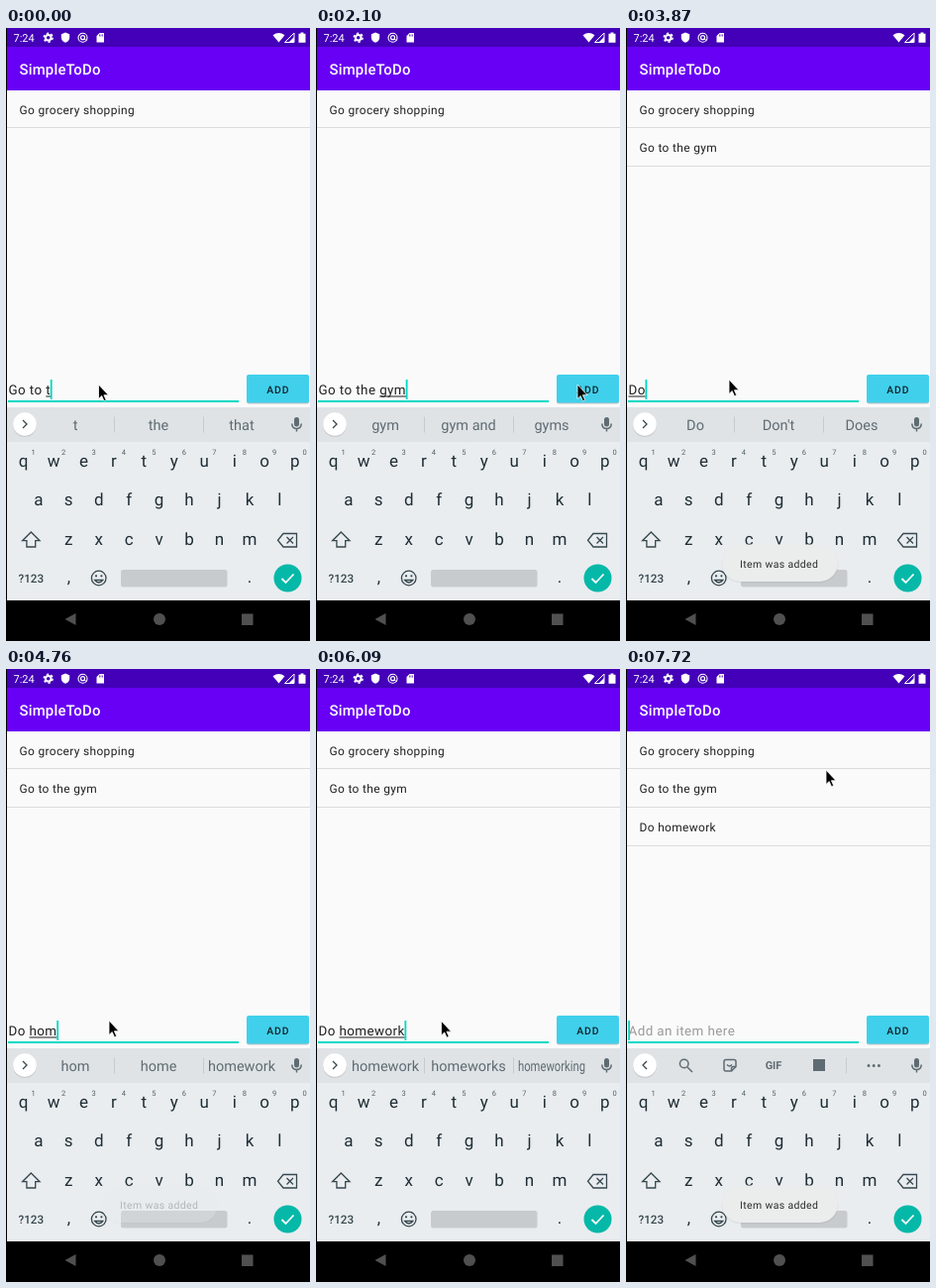
Animation of 307x619 px, one loop 8000 ms. Source, as an HTML page:

```html
<!DOCTYPE html>
<html lang="en">
<head>
<meta charset="utf-8">
<title>To-do list</title>
<style>
html, body { margin: 0; width: 100%; height: 100%; overflow: hidden; background: #000; }
svg { display: block; width: 307px; height: 619px; font-family: Roboto, sans-serif; text-rendering: geometricPrecision; }
text { white-space: pre; }
.row { font-size: 11.9px; letter-spacing: .37px; fill: #202020; }
.field { font-size: 13.4px; letter-spacing: .42px; }
.word { font-size: 14.5px; fill: #5f6b72; text-anchor: middle; }
.key { font-size: 17px; fill: #1f2d35; text-anchor: middle; }
.digit { font-size: 7.5px; fill: #546168; text-anchor: middle; }
.line { fill: none; stroke: #37474f; stroke-width: 1.3; }
.tool { fill: none; stroke: #5f6b72; stroke-width: 1.5; }
</style>
</head>
<body>
<svg viewBox="0 0 307 619">
  <rect width="307" height="619" fill="#000"/>
  <rect x="1" width="306" height="19" fill="#4300b8"/>
  <rect x="1" y="19" width="306" height="44" fill="#6800f5"/>
  <rect x="1" y="63" width="306" height="320" fill="#fafafa"/>

  <!-- status bar -->
  <g fill="#fff">
    <text x="7.5" y="13.5" font-size="11">7:24</text>
    <circle cx="42.7" cy="9.7" r="2.8" fill="none" stroke="#fff" stroke-width="2"/>
    <circle cx="42.7" cy="9.7" r="4.4" fill="none" stroke="#fff" stroke-width="1.6" stroke-dasharray="2.3 2.3"/>
    <path d="M60 4.5l4.2 1.7v3.2c0 2.700-1.800 4.600-4.200 5.400-2.400-.8-4.200-2.700-4.200-5.400V6.200z"/>
    <circle cx="77.500" cy="9.700" r="4.500" fill="none" stroke="#fff" stroke-width="1.100"/>
    <circle cx="77.500" cy="9.700" r="2" fill="none" stroke="#fff" stroke-width="1.200"/>
    <path d="M79.500 8v3.500l2 1" fill="none" stroke="#fff"/>
    <path d="M94.500 5h4.500v9.500h-7.500v-6.500z"/>
    <path d="M94.500 6.500v2M96 6.500v2M97.500 6.500v2" stroke="#4300b8" stroke-width=".7"/>
    <path d="M275.500 14.500L269.500 7.200q6-4.600 12 0z"/>
    <path d="M291 5v9.500h-9.500z" fill="none" stroke="#fff"/>
    <path d="M291 9v5.500h-5.500z"/>
    <path d="M295.500 5.800h2v-1.300h3v1.300h2v9h-7z"/>
  </g>
  <text x="13.500" y="47" font-size="14.900" font-weight="500" letter-spacing=".19" fill="#fff">SimpleToDo</text>

  <g id="rows"></g>

  <!-- input and button -->
  <text id="hint" class="field" x="2.500" y="370" fill="#9a9a9a">Add an item here</text>
  <text id="typed" class="field" x="2.500" y="370" fill="#202020"></text>
  <rect id="under" y="371.500" height="1" fill="#202020"/>
  <rect x="2" y="376" width="233" height="2" fill="#00d9c4"/>
  <rect id="caret" y="355" width="1.800" height="20" fill="#00d9c4"/>
  <rect x="243" y="351.500" width="63" height="28" rx="2" fill="#000" opacity=".22"/>
  <rect id="button" x="243" y="350" width="63" height="28.500" rx="2"/>
  <text x="274.800" y="368.500" font-size="10.400" font-weight="500" letter-spacing=".8" text-anchor="middle" fill="#0c2026">ADD</text>

  <!-- keyboard -->
  <rect x="1" y="383" width="306" height="195" fill="#e9edef"/>
  <rect x="1" y="383" width="306" height="35" fill="#dfe3e6"/>
  <circle cx="19" cy="401" r="12" fill="#000" opacity=".1"/>
  <circle cx="19" cy="400" r="11.800" fill="#fff"/>
  <path id="chevron" d="M-2 -4l4 4-4 4" class="line" stroke-width="1.600"/>
  <g id="words"><path d="M109.500 392.500v16M199.500 392.500v16" stroke="#c6cbce"/></g>
  <g id="tools" class="tool">
    <circle cx="58.700" cy="398.500" r="4.300"/>
    <path d="M62 402l5 5"/>
    <path d="M101 394.500h8q2 0 2 2v5l-4.500 4.500h-5.500q-2 0-2-2v-7.500q0-2 2-2zM111 401.500h-2.500q-2 0-2 2v2.500M102 399.500q2.500 3 5 0"/>
    <text x="149" y="404" font-size="11" font-weight="700" text-anchor="middle" stroke="none" fill="#5f6b72">GIF</text>
    <rect x="189" y="394" width="12" height="12" stroke="none" fill="#5f6b72"/>
    <path d="M222.500 392.500v16" stroke="#c6cbce" stroke-width="1"/>
    <path d="M245 400.500h.01M250.200 400.500h.01M255.400 400.500h.01" stroke-width="3" stroke-linecap="round"/>
  </g>
  <rect x="291" y="393" width="5" height="9.500" rx="2.500" fill="#5f6b72"/>
  <path d="M288.800 399.500q0 5 4.700 5t4.700-5M293.500 404.500v3" class="tool" stroke-width="1.300"/>

  <g id="keys"></g>
  <path class="line" d="M25.300 509l8.700 8.700h-4.300v6.300h-8.800v-6.300h-4.300z"/>
  <path class="line" d="M280 510.500h13.500v13.500h-13.500l-5.500-6.750zM283.500 514l6.500 6.500M290 514l-6.500 6.500"/>
  <text x="25.300" y="560" font-size="11.700" font-weight="500" text-anchor="middle" fill="#37474f">?123</text>
  <text class="key" x="63.500" y="560">,</text>
  <text class="key" x="246" y="560">.</text>
  <circle class="line" cx="93.700" cy="555.500" r="7.300"/>
  <path class="line" d="M89.700 557.500q4 5 8 0z"/>
  <path d="M91 553.300h.01M96.400 553.300h.01" stroke="#37474f" stroke-width="2.200" stroke-linecap="round"/>
  <rect x="116" y="547" width="107.500" height="17.500" rx="2.500" fill="#c7cbce"/>
  <circle cx="284.500" cy="555.500" r="14" fill="#05b8a8"/>
  <path d="M278.500 556l4 4 8-8.500" fill="none" stroke="#fff" stroke-width="1.800"/>

  <!-- navigation bar -->
  <g fill="#505050">
    <path d="M59.500 597l11-6v12z"/>
    <circle cx="155" cy="597" r="6"/>
    <rect x="238" y="591.500" width="11.500" height="11.500"/>
  </g>

  <g id="toast">
    <rect x="96.500" y="522.500" width="118" height="38" rx="19" fill="#000" opacity=".05"/>
    <rect x="97" y="521.500" width="117" height="37.500" rx="18.700" fill="#ebecec"/>
    <text x="115" y="545" font-size="10.450" letter-spacing=".38" fill="#2b2b2b">Item was added</text>
  </g>
  <path id="mouse" d="M0 0V14.500l3.200-3 2.300 5.200 2.200-1-2.300-5H10z" fill="#000" stroke="#fff" stroke-width=".8"/>
</svg>
<script>
const LOOP = 8000, TICK = 148.5;
const $ = id => document.getElementById(id);

function add(parent, tag, attrs, text = '') {
  const el = document.createElementNS('http://www.w3.org/2000/svg', tag);
  for (const k in attrs) el.setAttribute(k, attrs[k]);
  el.textContent = text;
  return parent.appendChild(el);
}

// time, typed text, keyboard strip
const typing = [
  [0, 'Go to t', 't|the|that'],
  [150, 'Go to the', 'the|them|then'],
  [300, 'Go to the ', 'best|first|other'],
  [600, 'Go to the g', 'g|gym|grocery'],
  [900, 'Go to the gy', 'gy|gym|gyms'],
  [1050, 'Go to the gym', 'gym|gym and|gyms'],
  [2540, '', ''],
  [2840, '', 'tools'],
  [3720, 'D', "D|Do|Don't"],
  [3870, 'Do', "Do|Don't|Does"],
  [4320, 'Do ', 'you|not|it'],
  [4610, 'Do ho', 'ho|how|home'],
  [4760, 'Do hom', 'hom|home|homework'],
  [4910, 'Do home', 'home|homes|homework'],
  [5350, 'Do homew', 'homew|homework|home'],
  [5500, 'Do homewo', 'homewo|homework|home'],
  [5640, 'Do homewor', 'homewor|homework|home'],
  [5790, 'Do homework', 'homework|homeworks|homeworking'],
  [6830, '', ''],
  [7130, '', 'tools']
];
const caretOff = [[1500, 2090], [2980, 3430], [6240, 6680], [7280, 7570]];
const pressed = [[2390, 2690], [6680, 6980]];
// start, end, from x, y, to x, y
const moves = [
  [1400, 2050, 93.5, 360, 264, 360],
  [2700, 2960, 264, 360, 104, 355],
  [5950, 6600, 104, 355, 297, 359],
  [7430, 7700, 297, 359, 202, 102]
];
const items = [['Go grocery shopping', 0, 0], ['Go to the gym', 2540, 2690], ['Do homework', 6830, 6980]];

const rows = items.map(([label, lineAt, textAt], i) => ({
  lineAt, textAt,
  text: add($('rows'), 'text', { class: 'row', x: 13.5, y: 86.5 + 38.6 * i }, label),
  line: add($('rows'), 'rect', { x: 1, y: 100 + 39 * i, width: 306, height: 1, fill: '#dcdcdc' })
}));

['qwertyuiop', 'asdfghjkl', 'zxcvbnm'].forEach((letters, r) => {
  [...letters].forEach((ch, i) => {
    const x = [17.6, 32.8, 63.2][r] + 30.45 * i;
    add($('keys'), 'text', { class: 'key', x, y: [443, 482, 522][r] }, ch);
    if (!r) add($('keys'), 'text', { class: 'digit', x: x + 10, y: 431 }, (i + 1) % 10);
  });
});

const slots = [70, 154, 238].map(x => add($('words'), 'text', { class: 'word', transform: `translate(${x} 406)` }));
const room = [72, 76, 68];

const show = (el, on) => el.setAttribute('visibility', on ? 'visible' : 'hidden');
const within = (t, spans) => spans.some(([a, b]) => t >= a && t < b);
const ramp = (t, a, b) => Math.min(1, Math.max(0, (t - a) / (b - a)));

let last = null;
function setTyping(state) {
  if (state === last) return;
  last = state;
  const [, text, strip] = state, tools = strip === 'tools';
  const typed = $('typed');
  typed.textContent = text;
  show($('hint'), !text);
  const end = text ? 2.5 + typed.getComputedTextLength() : 2.5;
  const from = text.lastIndexOf(' ') + 1;
  const start = from ? 2.5 + typed.getSubStringLength(0, from) : 2.5;
  $('under').setAttribute('x', start);
  $('under').setAttribute('width', Math.max(0, end - start));
  $('caret').setAttribute('x', end - .3);

  $('chevron').setAttribute('transform', `translate(19 400) scale(${tools ? -1 : 1} 1)`);
  $('tools').style.display = tools ? '' : 'none';
  $('words').style.display = strip && !tools ? '' : 'none';
  if (!strip || tools) return;
  // the keyboard condenses words wider than their slot
  strip.split('|').forEach((word, i) => {
    slots[i].textContent = word;
    const k = Math.min(1, room[i] / slots[i].getComputedTextLength());
    slots[i].setAttribute('transform', `translate(${70 + 84 * i} 406) scale(${k} 1)`);
  });
}

function draw(t) {
  const q = Math.floor((t + 10) / TICK) * TICK;
  t += 4;
  setTyping(typing.filter(s => t >= s[0]).pop());
  show($('caret'), !within(t, caretOff));
  $('button').setAttribute('fill', within(t, pressed) ? '#3cb5cd' : '#40d0ec');
  for (const r of rows) {
    show(r.text, t >= r.textAt);
    show(r.line, t >= r.lineAt);
  }
  const fade = ramp(q, 2500, 2900) - ramp(q, 4500, 4850) + ramp(q, 6820, 7200);
  $('toast').setAttribute('opacity', fade);

  const [a, b, x0, y0, x1, y1] = moves.filter(m => q >= m[0]).pop() || moves[0];
  const p = ramp(q, a, b), e = p * p * (3 - 2 * p);
  $('mouse').setAttribute('transform', `translate(${x0 + (x1 - x0) * e} ${y0 + (y1 - y0) * e})`);
}

const begin = performance.now();
function frame() {
  draw((performance.now() - begin) % LOOP);
  requestAnimationFrame(frame);
}
frame();
</script>
</body>
</html>
```
